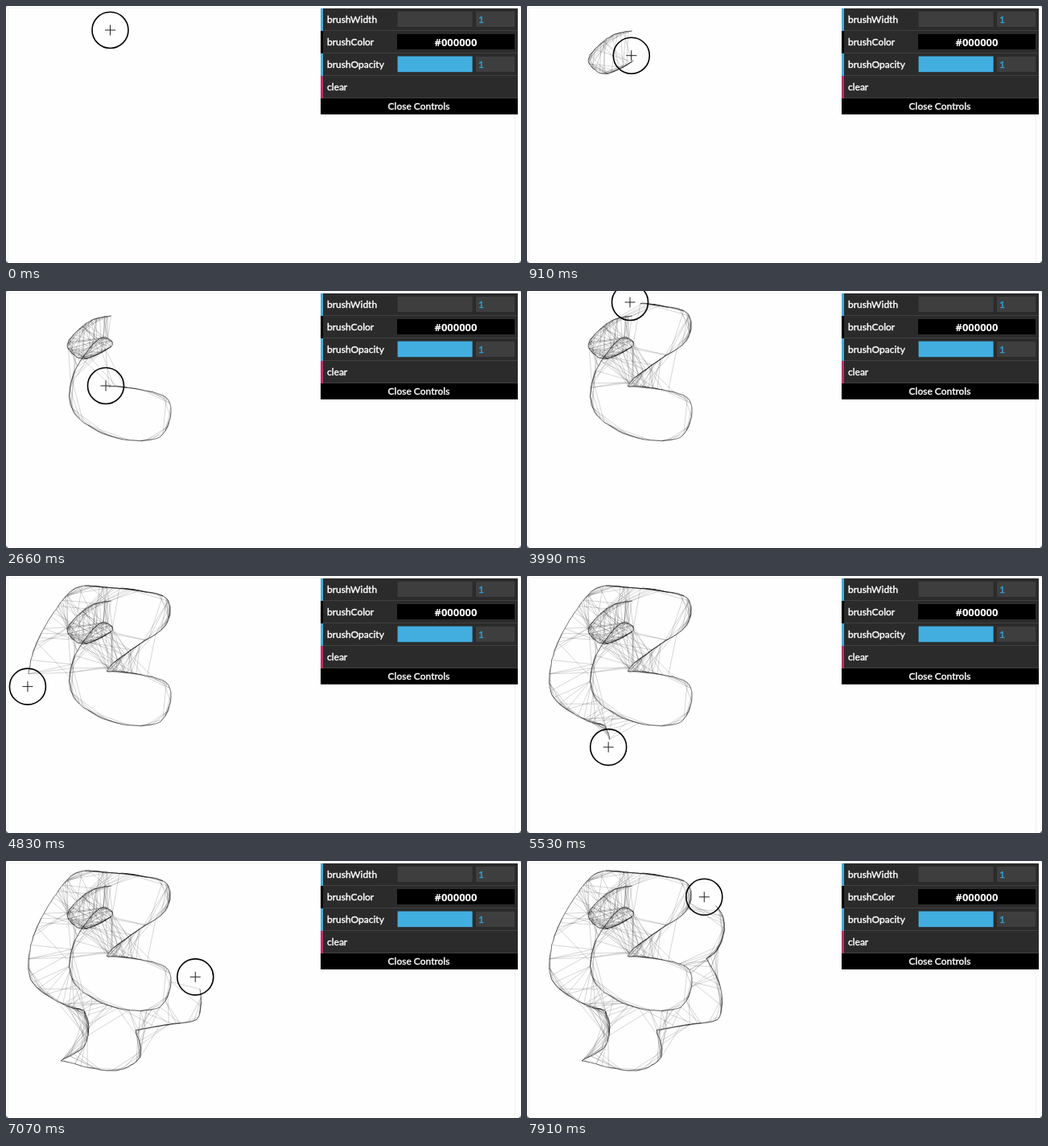
Write an HTML page with a canvas that moves like this. It is 640x320 px and loops after 7.98 s.

```html
<!DOCTYPE html>
<html lang="en">
<head>
<meta charset="utf-8">
<title>Web brush</title>
<style>
  html, body { margin: 0; width: 100%; height: 100%; overflow: hidden; background: #fefefe; }
  canvas, svg { position: absolute; left: 0; top: 0; width: 640px; height: 320px; }
  text { font: 12px Lato, sans-serif; fill: #fff; stroke: #fff; stroke-width: .4px; }
  .value { fill: #2fa1d6; stroke: #2fa1d6; }
  .hex { font: bold 13px "Open Sans", sans-serif; stroke: none; }
  .mid { text-anchor: middle; }
  .field { fill: #3e3e3e; }
  .blue { fill: #42aee0; }
</style>
</head>
<body>
<canvas width="640" height="320"></canvas>
<svg viewBox="0 0 640 320">
  <path d="M2.5 320V2.5H632.5V320" fill="none" stroke="#f1f1f1"/>
  <path d="M0 317v3h3zM640 317v3h-3z" fill="#777"/>
  <path d="M0 0h2l-2 2zM640 0h-2l2 2z" fill="#ccc"/>
  <g id="panel">
    <rect x="391" y="3" width="245" height="112" fill="#2b2b2b"/>
    <path d="M391 30.5h245M391 58.5h245M391 86.5h245M391 114.5h245" stroke="#404040"/>
    <rect x="391" y="3" width="3" height="28" class="blue"/>
    <rect x="391" y="31" width="3" height="28"/>
    <rect x="391" y="59" width="3" height="28" class="blue"/>
    <rect x="391" y="87" width="3" height="28" fill="#c03068"/>
    <rect x="391" y="115" width="245" height="20"/>
    <rect x="486.6" y="7" width="93" height="19" class="field"/>
    <rect x="584" y="7" width="48" height="19" class="field"/>
    <rect x="486" y="35" width="146" height="19"/>
    <rect x="486.6" y="62.6" width="93" height="19.6" class="blue"/>
    <rect x="584" y="63" width="48" height="19" class="field"/>
    <text x="399" y="21">brushWidth</text>
    <text x="399" y="49">brushColor</text>
    <text x="399" y="77">brushOpacity</text>
    <text x="399" y="105">clear</text>
    <text x="587" y="21" class="value">1</text>
    <text x="587" y="77" class="value">1</text>
    <text x="559" y="49.5" class="hex mid">#000000</text>
    <text x="513" y="129" class="mid">Close Controls</text>
  </g>
  <g id="cursor" fill="none" stroke="#000">
    <circle r="22.5" stroke-width="1.6"/>
    <path d="M-6.5 0H6.5M0 -6.5V6.5" stroke="#222"/>
  </g>
</svg>
<script>
const STEP = 70, LOOP = 7980;
const SAMPLES = 3, REACH = 62, CHANCE = 0.2;

// Each gesture is a smooth curve through a few points, evenly spaced in time.
const gestures = [
  { from: 0, to: 36, via: '129.5,30 101,38 75,66 96,84 131,67 114,59 82,104 83,150 131,181 190,181 201,135 150,119.5 125,118.5' },
  { from: 38, to: 76, via: '124,118 133,107 165,84 198,60 199,28 163,17.5 128,14 87,14 58,45 32,96 29.5,147 68,177 96,185' },
  { from: 76, to: 83, via: '96,185 101.5,206 95,231 67,248' },
  { from: 83, to: 92, via: '67,248 130,260.5 165,244 160,210' },
  { from: 92, to: 103, via: '160,210 202,202.5 237,195 239,155 222,121' },
  { from: 104, to: 114, via: '222,121 236,109 244,84 238,60 210,37.5' }
];
for (const g of gestures) g.points = g.via.split(' ').map(p => p.split(',').map(Number));

const ctx = document.querySelector('canvas').getContext('2d');
const cursor = document.getElementById('cursor');

function random(seed) {
  return () => {
    seed = (seed * 1664525 + 1013904223) >>> 0;
    return seed / 4294967296;
  };
}

function spline(points, t) {
  const last = points.length - 1;
  const i = Math.min(Math.floor(t * last), last - 1);
  const u = t * last - i, v = 1 - u;
  const a = points[i], b = points[i + 1];
  const before = points[Math.max(i - 1, 0)], after = points[Math.min(i + 2, last)];
  return a.map((_, k) =>
    v * v * (1 + 2 * u) * a[k] + u * u * (3 - 2 * u) * b[k] +
    u * v * (v * (b[k] - before[k]) - u * (after[k] - a[k])) / 2);
}

function pointAt(step) {
  const g = gestures.findLast(g => g.from <= step);
  return spline(g.points, Math.min((step - g.from) / (g.to - g.from), 1));
}

const distance = (a, b) => Math.hypot(a[0] - b[0], a[1] - b[1]);

// The pencil line plus random threads to nearby earlier points.
function buildMarks() {
  const rnd = random(7), dots = [], marks = [];
  for (let n = 0; n <= (LOOP / STEP - 2) * SAMPLES; n++) {
    const step = n / SAMPLES;
    const [x, y] = pointAt(step);
    const dot = [x + 0.8 + rnd() * 0.8, y + 0.2 + rnd() * 0.8];
    const last = dots[dots.length - 1];
    if (last) {
      if (distance(dot, last) < 2) continue;
      marks.push({ step, from: last, to: dot, alpha: 0.55 });
    }
    for (const old of dots) {
      if (rnd() < CHANCE * (1 - distance(dot, old) / REACH)) {
        marks.push({ step, from: old, to: dot, alpha: 0.16 });
      }
    }
    dots.push(dot);
  }
  return marks;
}

const marks = buildMarks();
let shown = -1;

function draw(step) {
  ctx.clearRect(0, 0, 640, 320);
  for (const m of marks) {
    if (m.step > step - 1) break;
    ctx.strokeStyle = `rgba(0,0,0,${m.alpha})`;
    ctx.beginPath();
    ctx.moveTo(...m.from);
    ctx.lineTo(...m.to);
    ctx.stroke();
  }
  cursor.setAttribute('transform', `translate(${pointAt(step).map(v => v.toFixed(2))})`);
}

const start = performance.now();
function tick() {
  const step = Math.floor((performance.now() - start) % LOOP / STEP);
  if (step !== shown) draw(shown = step);
  requestAnimationFrame(tick);
}
tick();
</script>
</body>
</html>
```
